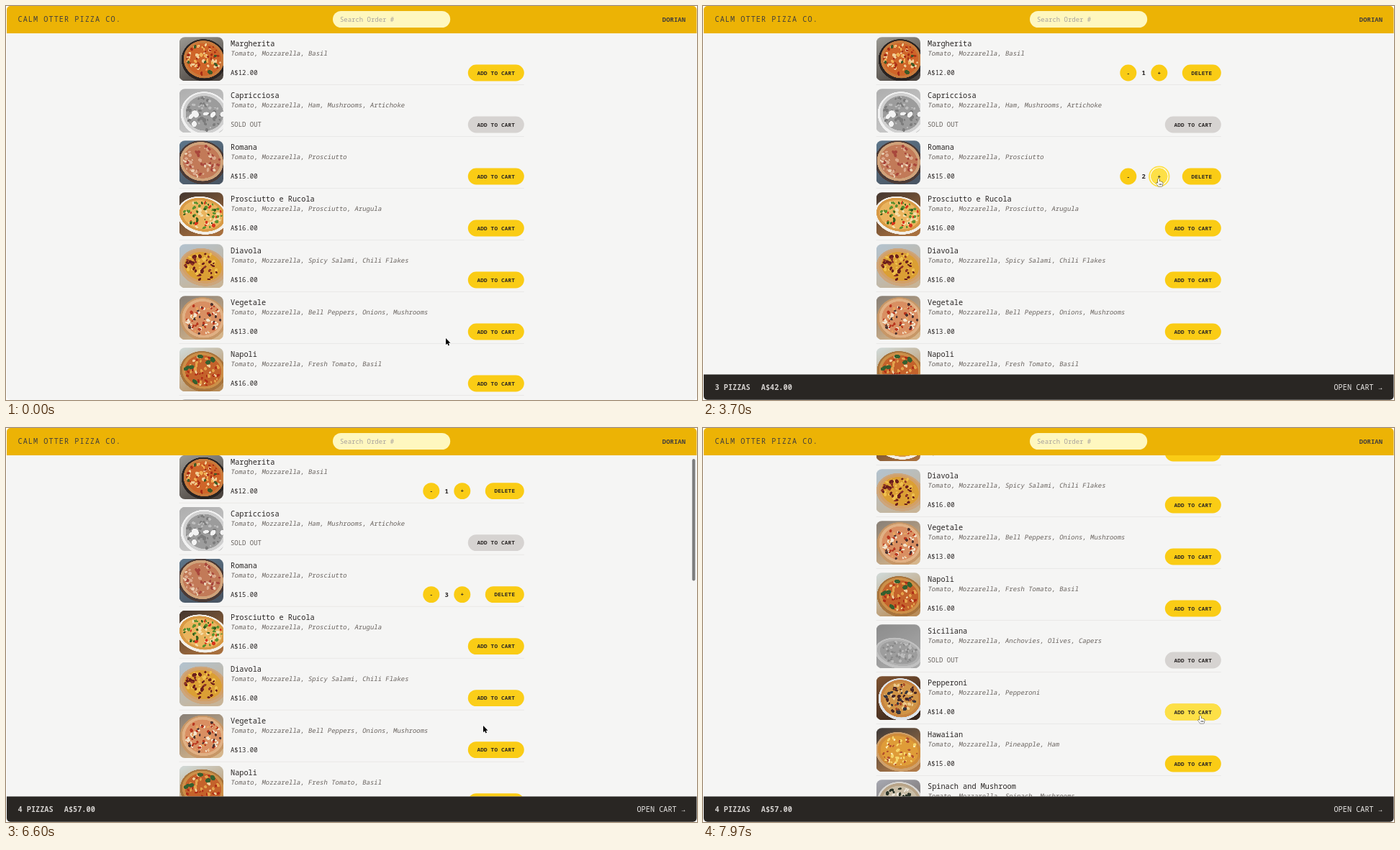
Recreate the animation shown at these times as an HTML page with a canvas. Size 960 px wide and 548 px high, loop 8 s.

```html
<!DOCTYPE html>
<html lang="en">
<head>
<meta charset="utf-8">
<title>Pizza menu</title>
<style>
  html, body { margin: 0; width: 100%; height: 100%; overflow: hidden; background: #fff; }
  canvas { display: block; width: 960px; height: 548px; }
</style>
</head>
<body>
<canvas id="stage"></canvas>
<script>
const W = 960, H = 548, LOOP = 8000, ROW = 72, HEAD = 38, FOOT = 512.5;
const MONO = '"Noto Sans Mono", "DejaVu Sans Mono", monospace';
const INK = '#292524', YELLOW = '#facc15', LIGHT = '#fde047';

const canvas = document.getElementById('stage');
const ctx = canvas.getContext('2d');
const dpr = window.devicePixelRatio || 1;
canvas.width = W * dpr;
canvas.height = H * dpr;

// photo: [sky, table], rim, crust, sauce, [cx, cy, rx, ry], toppings [colour, count, size]
const menu = [
  { name: 'Margherita', parts: 'Tomato, Mozzarella, Basil', price: 12,
    photo: [['#96948e', '#4b443f'], '#2a2422', '#c87a3c', '#cf6529', [34, 31, 28, 26],
      [['#f1cf98', 34, 2.6], ['#a82d16', 26, 2.2], ['#f0b055', 14, 2.4], ['#3d5a28', 6, 3.4]]] },
  { name: 'Capricciosa', parts: 'Tomato, Mozzarella, Ham, Mushrooms, Artichoke', price: 0,
    photo: [['#a4a4a4', '#c4c4c4'], '#f0f0f0', '#c9c9c9', '#8c8c8c', [35, 34, 30, 28],
      [['#686868', 34, 3], ['#b4b4b4', 18, 2.4], ['#f2f2f2', 6, 5]]] },
  { name: 'Romana', parts: 'Tomato, Mozzarella, Prosciutto', price: 15,
    photo: [['#5c7488', '#4a5664'], '#4a3a36', '#cfa27a', '#c27a58', [31, 29, 30, 27],
      [['#dba88c', 26, 3], ['#a8473c', 24, 2.6], ['#ead0b4', 14, 2.2]]] },
  { name: 'Prosciutto e Rucola', parts: 'Tomato, Mozzarella, Prosciutto, Arugula', price: 16,
    photo: [['#4a3a30', '#a8703e'], '#f3efe8', '#d99a45', '#eab45e', [32, 31, 32, 23],
      [['#f3dca6', 22, 3], ['#d8351d', 10, 2.8], ['#5c9130', 26, 2.8], ['#375f1c', 14, 2.2]]] },
  { name: 'Diavola', parts: 'Tomato, Mozzarella, Spicy Salami, Chili Flakes', price: 16,
    photo: [['#b4c2cc', '#c8b497'], '#cda67c', '#d3a066', '#db9f34', [33, 31, 30, 23],
      [['#efc04e', 22, 3], ['#6c1f1c', 26, 3], ['#8f3526', 10, 2.4]]] },
  { name: 'Vegetale', parts: 'Tomato, Mozzarella, Bell Peppers, Onions, Mushrooms', price: 13,
    photo: [['#8d8378', '#d6b68c'], '#c79767', '#e0b084', '#d98f62', [33, 31, 29, 27],
      [['#f2e3cc', 30, 2.8], ['#b8371f', 22, 2.6], ['#4c3330', 16, 2], ['#e8a35e', 10, 2.2]]] },
  { name: 'Napoli', parts: 'Tomato, Mozzarella, Fresh Tomato, Basil', price: 16,
    photo: [['#cfd6d2', '#b88c58'], '#a8743c', '#cc8f48', '#c4622b', [33, 32, 29, 25],
      [['#e3a24c', 22, 3], ['#b02f18', 20, 2.8], ['#efcf9c', 10, 2.4], ['#35602f', 7, 4]]] },
  { name: 'Siciliana', parts: 'Tomato, Mozzarella, Anchovies, Olives, Capers', price: 0,
    photo: [['#7c7c7c', '#9c9c9c'], '#b8b8b8', '#a4a4a4', '#8e8e8e', [31, 39, 30, 18],
      [['#b2b2b2', 28, 2.8], ['#767676', 26, 2.2]]] },
  { name: 'Pepperoni', parts: 'Tomato, Mozzarella, Pepperoni', price: 14,
    photo: [['#7a5030', '#38261c'], '#dfe4ea', '#c88440', '#d09446', [34, 31, 28, 26],
      [['#ecc98c', 22, 2.8], ['#4a2724', 26, 2.8], ['#36363e', 14, 3], ['#a84a28', 10, 2.2]]] },
  { name: 'Hawaiian', parts: 'Tomato, Mozzarella, Pineapple, Ham', price: 15,
    photo: [['#453e3a', '#b07a48'], '#cfa06a', '#d08c3a', '#df9c38', [32, 32, 30, 24],
      [['#f6d56a', 28, 2.8], ['#fbeab0', 14, 2.4], ['#b4502c', 20, 2.2]]] },
  { name: 'Spinach and Mushroom', parts: 'Tomato, Mozzarella, Spinach, Mushrooms', price: 14,
    photo: [['#a3a4ac', '#6c645e'], '#d8d6d2', '#b8a488', '#c9bda6', [33, 31, 29, 26],
      [['#ece6da', 24, 3], ['#2b3428', 30, 3]]] }
];

// time, x, y of the pointer tip
const path = [
  [0, 611, 462], [120, 611, 462], [900, 650, 190], [1330, 662, 94], [1800, 662, 94],
  [2150, 661, 238], [2600, 661, 238], [3000, 633, 240], [4200, 633, 240],
  [4620, 661, 310], [5040, 661, 310], [5480, 594, 311], [6000, 594, 311],
  [6480, 663, 414], [6600, 663, 414], [6860, 671, 405.6], [7350, 671, 405.6],
  [7800, 691, 400], [LOOP, 691, 400]
];
// time, row, change in quantity
const orders = [[1570, 0, 1], [2310, 2, 1], [3560, 2, 1], [4050, 2, 1], [4900, 3, 1], [5790, 3, -1]];
// from, to, row, label
const focused = [
  [1470, 1570, 0, 'ADD TO CART'], [2220, 2310, 2, 'ADD TO CART'], [3480, 4820, 2, '+'],
  [4820, 4900, 3, 'ADD TO CART'], [5720, 5790, 3, '-']
];

const clamp = u => Math.max(0, Math.min(1, u));
const ramp = (t, a, b) => clamp((t - a) / (b - a));
const ease = u => u * u * (3 - 2 * u);
const scrollAt = t => 274 * ease(ramp(t, 6577, 6865));
const quantity = (row, t) =>
  orders.reduce((n, [at, r, d]) => n + (r === row && t >= at ? d : 0), 0);

function pointer(t) {
  const i = Math.max(1, path.findIndex(p => p[0] > t));
  const [a, b] = [path[i - 1], path[i]];
  const u = ease(ramp(t, a[0], b[0]));
  return [a[1] + (b[1] - a[1]) * u, a[2] + (b[2] - a[2]) * u];
}

function buttons(row, t) {
  if (quantity(row, t) > 0) {
    return [
      { label: '-', x: 590.8, w: 23 },
      { label: '+', x: 633.8, w: 23 },
      { label: 'DELETE', x: 692.8, w: 54 }
    ];
  }
  return [{ label: 'ADD TO CART', x: 680.8, w: 78 }];
}

function hovered(row, label, t) {
  if (!menu[row].price || (t > 6540 && t < 6900)) return false;
  const b = buttons(row, t).find(k => k.label === label);
  if (!b) return false;
  const [x, y] = pointer(t);
  return Math.abs(x - b.x) < b.w / 2 && Math.abs(y - (93 + row * ROW - scrollAt(t))) < 11.4;
}

// Share of the last 300 ms spent over the button: a linear colour transition.
function glow(row, label, t) {
  let n = 0;
  for (let k = 0; k < 10; k++) n += hovered(row, label, Math.max(0, t - k * 30));
  return n / 10;
}

function box(x, y, w, h, r, fill) {
  ctx.beginPath();
  ctx.roundRect(x, y, w, h, r);
  ctx.fillStyle = fill;
  ctx.fill();
}

function text(str, x, y, size, color, { weight = 400, align = 'left', track = 0, slant = 0 } = {}) {
  ctx.save();
  ctx.translate(x, y);
  ctx.transform(1, 0, -slant, 1, 0, 0);
  ctx.font = `${weight} ${size}px ${MONO}`;
  ctx.letterSpacing = track + 'px';
  ctx.textAlign = align;
  ctx.fillStyle = color;
  ctx.fillText(str, 0, 0);
  ctx.restore();
}

function random(seed) {
  return () => {
    seed = (seed * 16807) % 2147483647;
    return seed / 2147483647;
  };
}

function makePhoto([[sky, table], rim, crust, sauce, [cx, cy, rx, ry], toppings], index) {
  const img = document.createElement('canvas');
  img.width = img.height = 244;
  const g = img.getContext('2d');
  const rnd = random(977 * (index + 3));
  const oval = (x, y, a, b, turn, fill) => {
    g.beginPath();
    g.ellipse(x, y, a, b, turn, 0, 7);
    g.fillStyle = fill;
    g.fill();
  };
  g.scale(4, 4);
  const back = g.createLinearGradient(12, 0, 44, 61);
  back.addColorStop(0, sky);
  back.addColorStop(1, table);
  g.fillStyle = back;
  g.fillRect(0, 0, 61, 61);
  oval(cx, cy + 1, rx + 3, ry + 3, 0.2, rim);
  oval(cx, cy, rx, ry, 0.2, crust);
  oval(cx, cy, rx * 0.87, ry * 0.86, 0.2, sauce);
  for (const [color, count, size] of toppings) {
    for (let i = 0; i < count; i++) {
      const a = rnd() * 6.283, d = Math.sqrt(rnd()) * 0.83, s = size * (0.5 + rnd() * 0.6);
      oval(cx + Math.cos(a) * d * rx, cy + Math.sin(a) * d * ry, s, s * (0.5 + rnd() * 0.4), rnd() * 3, color);
    }
  }
  return img;
}
const photos = menu.map((m, i) => makePhoto(m.photo, i));

function drawButton(row, b, y, t) {
  const on = focused.some(([from, to, r, label]) => t >= from && t < to && r === row && label === b.label);
  const pill = (grow, fill) =>
    box(b.x - b.w / 2 - grow, y - 11.4 - grow, b.w + 2 * grow, 22.8 + 2 * grow, 11.4 + grow, fill);
  if (on) {
    pill(3.2, LIGHT);
    pill(1.28, '#fff');
  }
  if (!menu[row].price) {
    pill(0, '#d6d3d1');
  } else {
    pill(0, YELLOW);
    ctx.globalAlpha = on ? 1 : glow(row, b.label, t);
    pill(0, LIGHT);
    ctx.globalAlpha = 1;
  }
  text(b.label, b.x, y + 2.8, 7.68, INK, { weight: 600, align: 'center', track: 0.19 });
}

function drawRow(row, t) {
  const { name, parts, price } = menu[row];
  const top = row * ROW - scrollAt(t);
  if (top > H || top < -ROW) return;

  ctx.save();
  ctx.beginPath();
  ctx.roundRect(240.6, top + 43.2, 61.4, 61.2, 8);
  ctx.clip();
  ctx.globalAlpha = price ? 1 : 0.85;
  ctx.drawImage(photos[row], 240.6, top + 43.2, 61.4, 61.2);
  ctx.restore();

  text(name, 312, top + 56, 10.24, '#292524', { weight: 500 });
  text(parts, 312, top + 69.4, 8.96, '#68625e', { slant: 0.18 });
  if (price) text(`A$${price}.00`, 312, top + 96.2, 8.96, '#292524');
  else text('SOLD OUT', 312, top + 168.2 - ROW, 8.96, '#68625e', { weight: 500 });

  const n = quantity(row, t);
  if (n) text(n, 612.3, top + 96.2, 8.96, INK, { weight: 600, align: 'center' });
  for (const b of buttons(row, t)) drawButton(row, b, top + 93, t);

  ctx.fillStyle = '#e7e5e4';
  ctx.fillRect(240.6, top + 109.2, 479.2, 0.8);
}

function drawHeader() {
  ctx.fillStyle = '#ecb305';
  ctx.fillRect(0, 0, W, HEAD);
  text('CALM OTTER PIZZA CO.', 16.5, 22.3, 10.24, '#44403c', { track: 1.024 });
  box(454, 7, 163.2, 23, 11.5, '#fef7bf');
  text('Search Order #', 464, 21.7, 8.96, '#a8a29e');
  text('DORIAN', 944, 21.7, 8.96, '#44403c', { weight: 600, align: 'right' });
}

function drawFooter(t) {
  let count = 0, total = 0;
  menu.forEach((m, i) => {
    const n = quantity(i, t);
    count += n;
    total += n * m.price;
  });
  ctx.fillStyle = '#292623';
  ctx.fillRect(0, FOOT, W, H - FOOT);
  text(`${count} PIZZAS`, 16.5, 534.2, 10.24, '#d6d3d1', { weight: 600 });
  text(`A$${total}.00`, 80.8, 534.2, 10.24, '#d6d3d1', { weight: 600 });
  text('OPEN CART →', 944, 534.2, 10.24, '#e7e5e4', { align: 'right' });
}

const arrow = new Path2D('M0 0V9.2L2.1 7.3L3.5 10.5L5 9.8L3.7 6.8H6.5Z');
const hand = new Path2D('M-.9 .9C-.9-.3 .9-.3 .9 .9V4Q2.3 3.3 2.7 4.5Q4 3.9 4.3 5Q5.6 4.6 5.7 6V8Q5.5 9.3 4.8 10.8H-.5Q-1 9.2-2.9 7.2C-3.8 6-2.3 5.2-.9 6.8Z');

function drawPointer(t) {
  const [x, y] = pointer(t);
  const over = menu.some((m, i) => buttons(i, t).some(b => hovered(i, b.label, t)));
  ctx.save();
  ctx.translate(x, y);
  ctx.lineJoin = 'round';
  ctx.lineWidth = over ? 0.9 : 1.4;
  ctx.strokeStyle = over ? '#111' : '#fff';
  ctx.fillStyle = over ? '#fff' : '#000';
  ctx.stroke(over ? hand : arrow);
  ctx.fill(over ? hand : arrow);
  if (over) {
    ctx.lineWidth = 0.6;
    ctx.stroke(new Path2D('M1 7V9M2.5 7V9M4 7V9'));
  }
  ctx.restore();
}

function draw(t) {
  ctx.setTransform(dpr, 0, 0, dpr, 0, 0);
  ctx.fillStyle = '#fff';
  ctx.fillRect(0, 0, W, H);
  const cart = t >= orders[0][0];

  ctx.save();
  ctx.beginPath();
  ctx.roundRect(1, 0, 958.5, 547.7, 5);
  ctx.clip();
  ctx.fillStyle = '#f5f5f4';
  ctx.fillRect(0, 0, W, H);

  ctx.save();
  ctx.beginPath();
  ctx.rect(0, HEAD, W, (cart ? FOOT : H) - HEAD);
  ctx.clip();
  menu.forEach((m, i) => drawRow(i, t));
  ctx.globalAlpha = ramp(t, 6560, 6590) * (1 - ramp(t, 7400, 7650));
  box(953.3, 41.1 + 0.366 * scrollAt(t), 4.2, 169.5, 2.1, '#7d7d7d');
  ctx.restore();

  drawHeader();
  if (cart) drawFooter(t);
  ctx.restore();
  drawPointer(t);
}

function tick(now) {
  draw(now % LOOP);
  requestAnimationFrame(tick);
}
requestAnimationFrame(tick);
</script>
</body>
</html>
```
